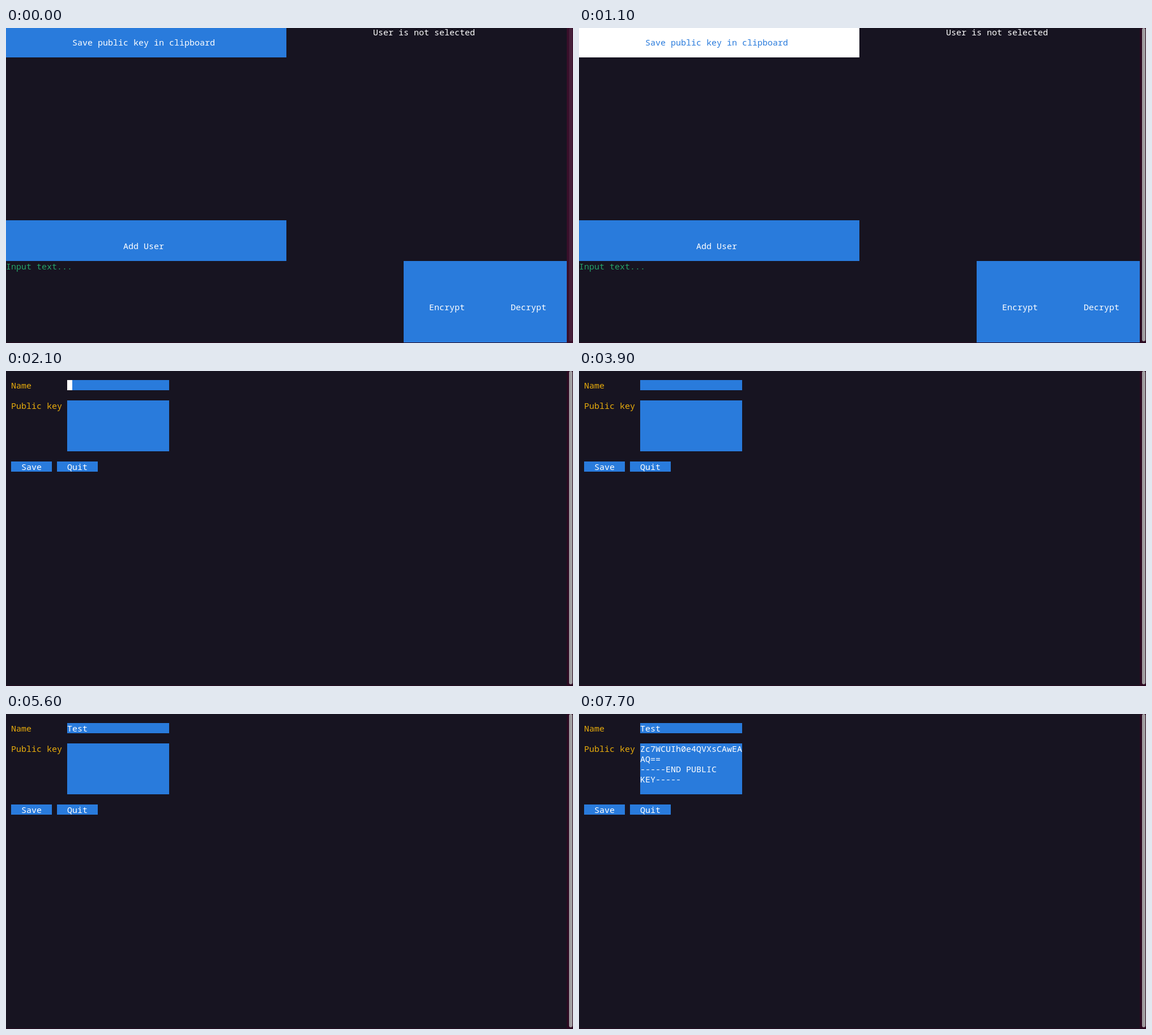
Write an HTML page that moves like this. It is 1001 by 557 pixels and loops after 8 s.

```html
<!DOCTYPE html>
<html lang="en">
<head>
<meta charset="utf-8">
<title>Key manager</title>
<style>
  html, body { margin: 0; width: 100%; height: 100%; overflow: hidden; background: #2c0a21; }
  svg { display: block; width: 1001px; height: 557px; }
  text { font: 15px "Noto Sans Mono", "DejaVu Sans Mono", monospace; fill: #fff; white-space: pre; }
  .panel { fill: #297bdc; }
  .button.active .panel { fill: #fff; }
  .button.active text { fill: #297bdc; }
  .label { fill: #e9ad0c; }
  .hint { fill: #26a269; }
  #track { fill: #380e2a; }
  #thumb { fill: #a09da0; }
</style>
</head>
<body>
<svg viewBox="0 0 1001 557">
  <rect width="990" height="556" fill="#171421"/>

  <rect id="track" x="990" width="11" height="557"/>
  <rect id="thumb" x="994" y="0" width="6" height="554" rx="3"/>

  <g id="home">
    <g class="button" id="copy">
      <rect class="panel" width="495" height="52"/>
      <text x="117" y="31">Save public key in clipboard</text>
    </g>
    <g class="button" id="add">
      <rect class="panel" y="340" width="495" height="72"/>
      <text x="207" y="391">Add User</text>
    </g>
    <text x="648" y="13">User is not selected</text>
    <text class="hint" x="0" y="427">Input text...</text>
    <rect class="panel" x="702" y="412" width="288" height="144"/>
    <text x="747" y="499">Encrypt</text>
    <text x="891" y="499">Decrypt</text>
  </g>

  <g id="form">
    <text class="label" x="9" y="31">Name</text>
    <rect class="panel" x="108" y="16" width="180" height="18"/>
    <text id="name" x="108" y="31"></text>
    <text class="label" x="9" y="67">Public key</text>
    <rect class="panel" x="108" y="52" width="180" height="90"/>
    <g id="key">
      <text x="108" y="67">Zc7WCUIh0e4QVXsCAwEA</text>
      <text x="108" y="85">AQ==</text>
      <text x="108" y="103">-----END PUBLIC</text>
      <text x="108" y="121">KEY-----</text>
    </g>
    <rect class="panel" x="9" y="160" width="72" height="18"/>
    <text x="27" y="175">Save</text>
    <rect class="panel" x="90" y="160" width="72" height="18"/>
    <text x="108" y="175">Quit</text>
    <rect id="cursor" width="9" height="18" fill="#fff"/>
  </g>
</svg>
<script>
  const LOOP = 8000, CELL = 9, FIELD_X = 108;
  const $ = id => document.getElementById(id);
  const show = (id, on) => $(id).style.display = on ? "" : "none";

  // [start, end, column, top] while the block cursor is lit
  const cursorSpans = [
    [2100, 2700, 0, 16], [3300, 3900, 0, 16], [4100, 4300, 0, 16],
    [4300, 4400, 1, 16], [4400, 4500, 2, 16], [4500, 5100, 3, 16],
    [5100, 5600, 4, 16], [6300, 6900, 0, 52], [7100, 7300, 0, 52],
    [7400, 7700, 0, 124]
  ];
  const keystrokes = [4300, 4400, 4500, 5100];

  function draw(t) {
    const inForm = t >= 2100;
    show("home", !inForm);
    show("form", inForm);

    $("copy").classList.toggle("active", t >= 1000 && t < 2000);
    $("add").classList.toggle("active", t >= 2000);

    // The scrollbar brightens in one intermediate step.
    $("thumb").style.opacity = t < 1000 ? 0.13 : t < 1100 ? 0.55 : 1;
    $("track").style.opacity = t < 1000 ? 1 : t < 1100 ? 0.5 : 0;

    const typed = keystrokes.filter(k => t >= k).length;
    $("name").textContent = "Test".slice(0, typed);
    show("key", t >= 7300);

    const span = cursorSpans.find(([start, end]) => t >= start && t < end);
    show("cursor", span);
    if (span) {
      $("cursor").setAttribute("x", FIELD_X + span[2] * CELL);
      $("cursor").setAttribute("y", span[3]);
    }
  }

  const origin = performance.now();
  function tick() {
    draw((performance.now() - origin) % LOOP);
    requestAnimationFrame(tick);
  }
  tick();
</script>
</body>
</html>
```
